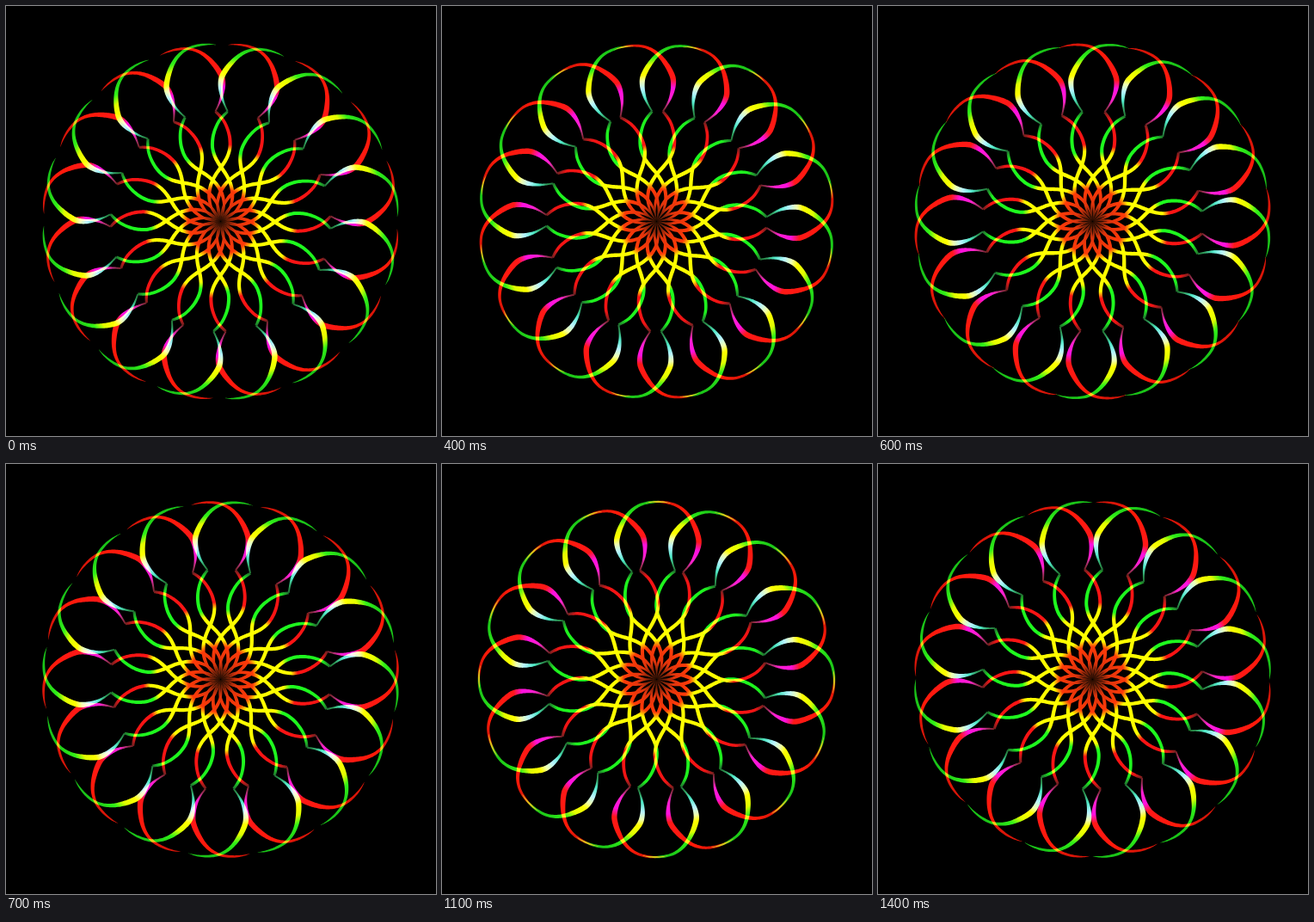
An HTML page with a canvas for the animation above (1500 ms loop, 500 by 500 pixels).

```html
<!DOCTYPE html>
<html lang="en">
<head>
<meta charset="utf-8">
<title>Kaleidoscope</title>
<style>
  html, body { margin: 0; width: 100%; height: 100%; overflow: hidden; background: #000; }
  canvas { display: block; width: 500px; height: 500px; }
</style>
</head>
<body>
<canvas id="c" width="500" height="500"></canvas>
<script>
const ctx = document.getElementById('c').getContext('2d');
const CX = 249.5, CY = 250.5, FOLD = 16, LOOP = 1500, STEP = 100;
const RAD = Math.PI / 180, SECTOR = 360 / FOLD, TILT = 0.5;

// Strand profile: radius, angle in degrees, half width
const inner = [
  [1, -42, 0.4], [14, -37, 1.1], [28, -28, 1.9], [42, -17, 2.1], [54, -7, 2.1],
  [64, 0.5, 2.2], [74, 5, 2.1], [85, 6.7, 2], [96, 6, 2], [106, 4.2, 1.9],
  [116, 1.6, 1.8], [123, -1, 1.7], [128, -3.2, 1.5]
];
const outer = [
  [128, -3.2, 1], [135, -1.6, 1], [143, -0.3, 1.5], [152, 0.4, 2.3], [160, 0.5, 2.9],
  [168, 0, 3.2], [176, -1.4, 3.1], [184, -3.2, 2.8], [192, -5.3, 2.3], [199, -7.8, 1.9],
  [204, -10.8, 1.6], [206.3, -14.5, 1.4], [206.5, -18, 0.8], [205.5, -20.5, 0.1]
];

function spline(pts, n) {
  const out = [], at = i => pts[Math.max(0, Math.min(pts.length - 1, i))];
  for (let i = 0; i < pts.length - 1; i++) {
    for (let j = 0; j < n; j++) {
      const u = j / n, p = [at(i - 1), at(i), at(i + 1), at(i + 2)];
      out.push([0, 1, 2].map(k => {
        const [a, b, c, d] = p.map(q => q[k]);
        return b + u / 2 * (c - a + u * (2 * a - 5 * b + 4 * c - d + u * (3 * (b - c) + d - a)));
      }));
    }
  }
  out.push(pts[pts.length - 1]);
  return out;
}

// Closed outline of a strand lying around the upward axis
function ribbon(pts) {
  const line = spline(pts, 7).map(([r, a, w]) =>
    [r * Math.sin(a * RAD), -r * Math.cos(a * RAD), w]);
  const left = [], right = [];
  line.forEach(([x, y, w], i) => {
    const p = line[Math.max(0, i - 1)], q = line[Math.min(line.length - 1, i + 1)];
    const dx = q[0] - p[0], dy = q[1] - p[1], k = w / (Math.hypot(dx, dy) || 1);
    left.push([x - dy * k, y + dx * k]);
    right.unshift([x + dy * k, y - dx * k]);
  });
  const path = new Path2D();
  left.concat(right).forEach(p => path.lineTo(p[0], p[1]));
  path.closePath();
  return path;
}

function paint(stops) {
  const g = ctx.createRadialGradient(0, 0, 0, 0, 0, 210);
  stops.forEach(([r, color]) => g.addColorStop(r / 210, color));
  return g;
}

const core = [[0, '#180800'], [8, '#6a2008'], [20, '#e0340c'], [38, '#ff3a08'], [46, '#ffff00']];
const red = paint([...core, [82, '#ffff00'], [90, '#ff1414'], [120, '#f01414'], [128, '#702020'],
  [134, '#a03060'], [143, '#ff20d0'], [157, '#ff10e0'], [167, '#ff1818'], [200, '#ff1a08'], [208, '#d01408']]);
const green = paint([...core, [74, '#ffff00'], [82, '#1eff1e'], [120, '#1ef01e'], [128, '#207030'],
  [135, '#30a060'], [144, '#50e8c8'], [155, '#b8f4ff'], [164, '#f0ffb0'], [171, '#ffff00'],
  [182, '#e0ff00'], [191, '#30f018'], [208, '#18c018']]);
const parts = [ribbon(inner), ribbon(outer)];

function strands(phase, side, fill) {
  ctx.fillStyle = fill;
  for (let k = 0; k < FOLD; k++) {
    ctx.save();
    ctx.rotate((TILT + k * SECTOR + side * phase) * RAD);
    ctx.scale(side, 1);
    parts.forEach(p => ctx.fill(p));
    ctx.restore();
  }
}

function draw(ms) {
  const step = Math.floor((ms % LOOP) / STEP);
  const phase = step * STEP / LOOP * SECTOR;
  ctx.setTransform(1, 0, 0, 1, 0, 0);
  ctx.globalCompositeOperation = 'source-over';
  ctx.fillStyle = '#000';
  ctx.fillRect(0, 0, 500, 500);
  ctx.translate(CX, CY);
  ctx.globalCompositeOperation = 'lighten';
  strands(phase, 1, red);
  strands(phase, -1, green);
}

const start = performance.now();
function tick() {
  draw(performance.now() - start);
  requestAnimationFrame(tick);
}
tick();
</script>
</body>
</html>
```
